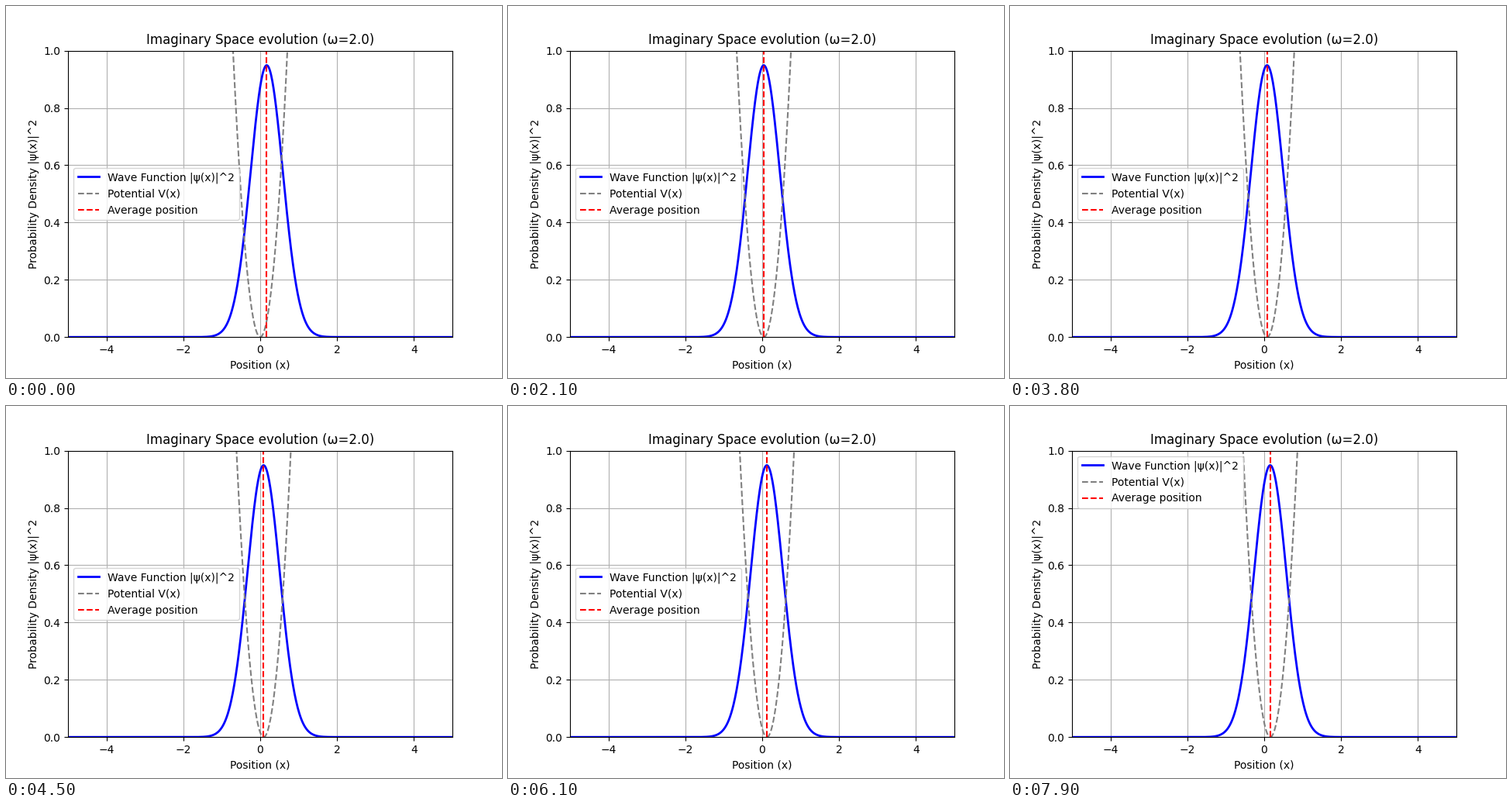
A matplotlib script for the animation above (8000 ms loop, 640 by 480 pixels).

```python
import numpy as np
import matplotlib.pyplot as plt
from matplotlib.animation import FuncAnimation

FRAMES = 80
INTERVAL = 100        # ms
OMEGA = 2.0
DRIFT = 0.002         # trap shift per step
START = 0.17          # packet position at the first step
WIDTH = np.sqrt(2) * OMEGA
DECAY = np.exp(-0.3 * WIDTH)
LAG = DRIFT * DECAY / (1 - DECAY)

x = np.linspace(-5, 5, 1000)


def trap_center(step):
    return DRIFT * step


def mean_position(step):
    """Packet relaxes towards the moving trap, then trails it slightly."""
    return trap_center(step) - LAG + (START + LAG) * DECAY**step


def potential(step):
    return 0.5 * OMEGA**2 * (x - trap_center(step))**2


def density(step):
    return np.sqrt(WIDTH / np.pi) * np.exp(-WIDTH * (x - mean_position(step))**2)


fig, ax = plt.subplots(figsize=(6.4, 4.8), dpi=100)
wave, = ax.plot(x, density(0), color="blue", lw=2, label="Wave Function |ψ(x)|^2")
trap, = ax.plot(x, potential(0), color="gray", ls="--", label="Potential V(x)")
mean = ax.axvline(mean_position(0), color="red", ls="--", label="Average position")

ax.set_xlim(-5, 5)
ax.set_ylim(0, 1)
ax.set_xlabel("Position (x)")
ax.set_ylabel("Probability Density |ψ(x)|^2")
ax.set_title(f"Imaginary Space evolution (ω={OMEGA})")
ax.grid(True)
ax.legend(loc="best")


def update(step):
    wave.set_ydata(density(step))
    trap.set_ydata(potential(step))
    mean.set_xdata([mean_position(step)] * 2)
    return wave, trap, mean


anim = FuncAnimation(fig, update, frames=FRAMES, interval=INTERVAL,
                     repeat=True, repeat_delay=0, blit=False)
plt.show()
```
